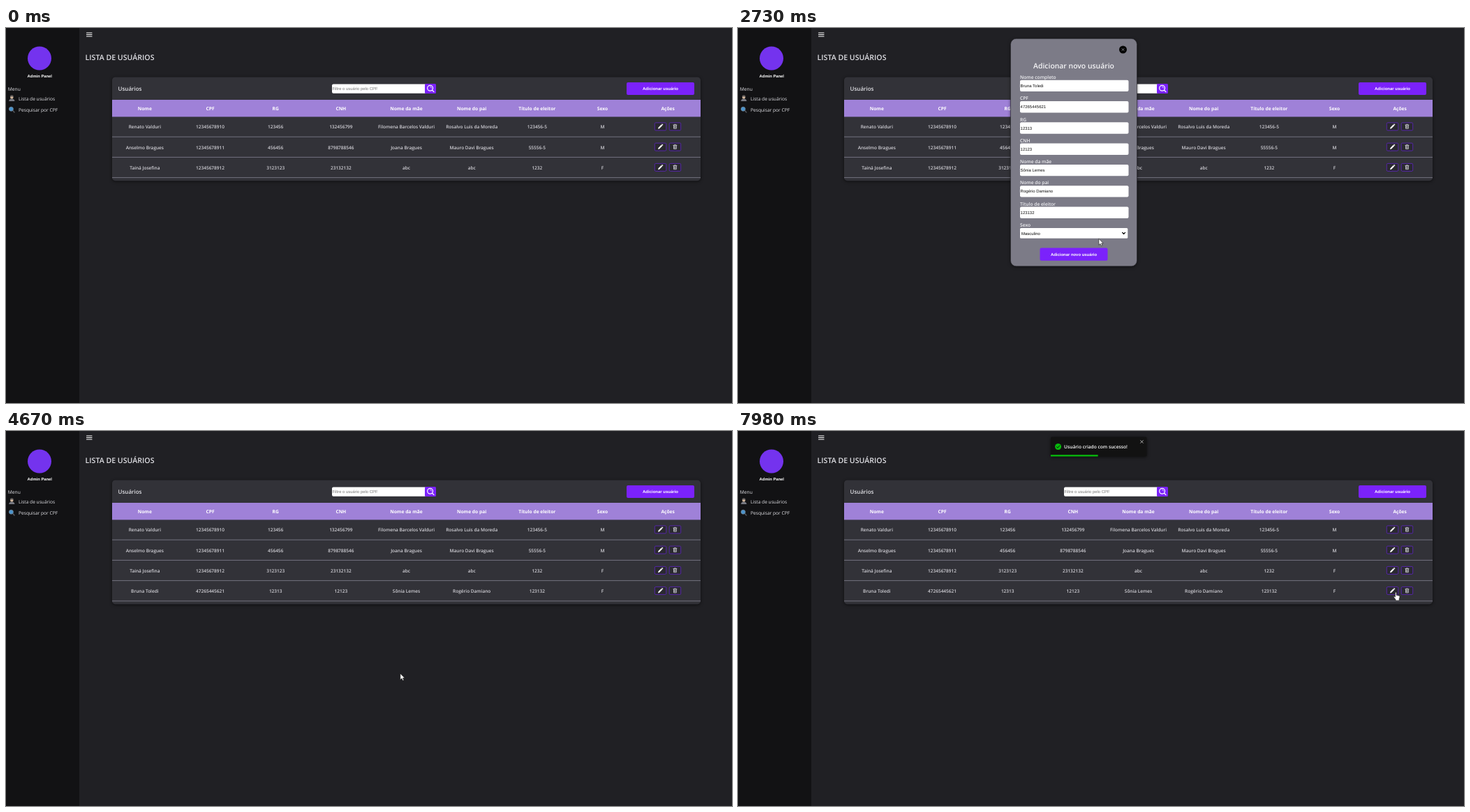
Recreate the animation shown at these times as an HTML page. Size 1040 px wide and 538 px high, loop 8000 ms.

```html
<!DOCTYPE html>
<html lang="pt-BR">
<head>
<meta charset="utf-8">
<title>Lista de usuários</title>
<style>
  html, body { margin: 0; width: 100%; height: 100%; overflow: hidden; background: #202024; }
  svg { display: block; width: 100vw; height: 100vh; }
  text { font-family: "Open Sans", "Noto Sans", sans-serif; text-rendering: geometricPrecision; white-space: pre; }
  .ui { font-family: "Liberation Sans", Arial, sans-serif; }
  .shade { filter: drop-shadow(0 1px 2px rgba(0, 0, 0, .6)); }
</style>
</head>
<body>
<svg id="stage" viewBox="0 0 1040 538" xmlns="http://www.w3.org/2000/svg"></svg>
<script>
const LOOP = 8000;
const PURPLE = '#7b22fb';
const PITCH = 29.25;
const COL = 843 / 9;

const heads = ['Nome', 'CPF', 'RG', 'CNH', 'Nome da mãe', 'Nome do pai', 'Título de eleitor', 'Sexo', 'Ações'];
const users = [
  ['Renato Valduri', '12345678910', '123456', '132456799', 'Filomena Barcelos Valduri', 'Rosalvo Luis da Moreda', '123456-5', 'M'],
  ['Anselmo Bragues', '12345678911', '456456', '8798788546', 'Joana Bragues', 'Mauro Davi Bragues', '55556-5', 'M'],
  ['Tainá Josefina', '12345678912', '3123123', '23132132', 'abc', 'abc', '1232', 'F'],
  ['Bruna Toledi', '47265445621', '12313', '12123', 'Sônia Lemes', 'Rogério Damiano', '123132', 'F']
];
const labels = ['Nome completo', ...heads.slice(1, 8)];

const rect = (x, y, w, h, fill, r = 0, extra = '') =>
  `<rect x="${x}" y="${y}" width="${w}" height="${h}" rx="${r}" fill="${fill}" ${extra}/>`;
const label = (x, y, size, str, { weight = 400, fill = '#e1e1e6', mid = false, ui = false, id = '' } = {}) =>
  `<text x="${x}" y="${y}" font-size="${size}" font-weight="${weight}" fill="${fill}"` +
  `${mid ? ' text-anchor="middle"' : ''}${ui ? ' class="ui"' : ''}${id && ` id="${id}"`}>${str}</text>`;
const line = (d, color, width) =>
  `<path d="${d}" fill="none" stroke="${color}" stroke-width="${width}" stroke-linecap="round" stroke-linejoin="round"/>`;
const button = (id, x, y, w, h, size, str) =>
  `<g id="${id}">${rect(x, y, w, h, PURPLE, 2)}` +
  label(x + w / 2, y + h / 2 + 2.1, size, str, { weight: 700, fill: '#fff', mid: true, ui: true }) + '</g>';

function sidebar() {
  return rect(0, 0, 105, 538, '#121214') +
    `<circle cx="48" cy="43.5" r="17" fill="#7433ee"/>` +
    label(48.3, 71.3, 5.85, 'Admin Panel', { weight: 700, fill: '#fff', mid: true, ui: true }) +
    label(2.8, 89.7, 6.7, 'Menu') +
    label(18, 104, 6.65, 'Lista de usuários') +
    label(18, 120.4, 6.65, 'Pesquisar por CPF') +
    // person
    `<path d="M4.2 105Q4.4 101.6 8.3 101.4Q12.2 101.6 12.4 105Z" fill="#777982"/>` +
    `<circle cx="8.3" cy="99.4" r="2.2" fill="#d3b79d"/>` +
    `<path d="M5.6 98.6Q6 96.3 8.3 96.3Q10.6 96.3 11 98.6Z" fill="#66615f"/>` +
    // magnifier
    line('M9.8 118.6L12 121', '#54565c', 1.5) +
    `<circle cx="7.4" cy="116.2" r="3" fill="#4b93cc" stroke="#6f8799" stroke-width=".8"/>`;
}

function row(cells, i) {
  const y = 127.2 + PITCH * i;
  const b = 135.9 + PITCH * i;
  const box = x => rect(x, b, 16.5, 11, '#2a2930', 1.5, 'stroke="#6025c4" stroke-width=".8"');
  return `<g id="row${i}">` +
    cells.map((c, k) => label(152 + COL * (k + .5), y + 17.2, 6.5, c, { weight: 600, fill: '#d3d2d8', mid: true })).join('') +
    `<path d="M152 ${y + PITCH - .3}H995" stroke="#7b7a88" stroke-width=".9"/>` +
    box(929.3) + box(950.2) +
    `<path transform="translate(937.5 ${b + 5.4})" fill="#fff" d="M-3.4 3.4L-3 1.5 1.2-2.7 2.7-1.2-1.5 3ZM1.6-3.1L2.3-3.7Q2.8-4 3.3-3.4L3.7-3Q4-2.6 3.6-2.2L3.1-1.6Z"/>` +
    `<g transform="translate(958.4 ${b + 5.4})">` +
    line('M-2.5-2.2H2.5M-.9-2.9H.9M-1.9-2V2.9H1.9V-2M-.7-.9V1.8M.7-.9V1.8', '#dddde2', .75) + '</g></g>';
}

function page() {
  return line('M115.5 7H123M115.5 9.5H123M115.5 12H123', '#fff', 1.2) +
    label(113.6, 45.8, 10.6, 'LISTA DE USUÁRIOS', { weight: 600 }) +
    `<rect id="card" class="shade" x="152" y="70.5" width="843" height="148.5" rx="4.5" fill="#323238"/>` +
    label(160.5, 90.2, 8, 'Usuários', { weight: 600 }) +
    rect(467, 80.5, 135, 13.3, '#fff', 2) +
    label(467.4, 89.1, 5.9, 'Filtre o usuário pelo CPF', { fill: '#757575', ui: true }) +
    rect(600, 80, 16, 14, PURPLE, 1.5) +
    `<circle cx="607.6" cy="86.2" r="3.9" fill="none" stroke="#fff" stroke-width="1.2"/>` +
    line('M610.5 89.2L613 91.6', '#fff', 1.3) + line('M607.6 84.2Q609.6 84.3 609.6 86.2', '#fff', .7) +
    button('add', 889, 78, 97, 18, 6, 'Adicionar usuário') +
    rect(152, 103, 843, 24.4, '#9f81d8') +
    heads.map((h, k) => label(152 + COL * (k + .5), 117.6, 6.7, h, { weight: 700, fill: '#fff', mid: true })).join('') +
    users.map(row).join('');
}

function modal() {
  const field = (name, i) => {
    const y = 74.7 + 30.3 * i;
    const isSelect = i === 7;
    const box = isSelect ? rect(404, 287, 154.3, 14.8, '#fff', 1.5) : rect(404, y, 155.5, 16.4, '#fff', 2);
    const value = isSelect
      ? label(406, 296.6, 5.95, '', { fill: '#000', ui: true, id: 'sex' })
      : label(404.6, y + 10.2, 5.97, users[3][i], { fill: '#111', ui: true });
    return label(404, y - 1.8, 6.7, name, { weight: 600, fill: '#efeff2' }) + box + value;
  };
  return '<g id="modal">' +
    rect(390.5, 15.3, 181, 326.5, '#7c7b87', 8, 'class="shade"') +
    rect(390.5, 15.3, 181, 326.5, 'none', 8, 'stroke="#25252a" stroke-width=".6"') +
    '<circle cx="551.5" cy="31" r="5.5" fill="#050505"/>' +
    line('M550.1 29.6L552.9 32.4M552.9 29.6L550.1 32.4', '#a9a9b3', .7) +
    label(481, 57.8, 10.4, 'Adicionar novo usuário', { weight: 600, fill: '#f4f4f6', mid: true }) +
    labels.map(field).join('') +
    line('M550.6 293.4L552.6 295.5 554.6 293.4', '#000', 1.2) +
    button('save', 432.5, 315.6, 97, 18.2, 5.93, 'Adicionar novo usuário') +
    '<g id="list">' + rect(404, 302, 154.2, 17, '#fff', 0, 'stroke="#55555c" stroke-width=".5"') +
    '<rect id="pick" x="404.2" y="302.3" width="153.8" height="8" fill="#1e90ff"/>' +
    label(406, 308.4, 5.95, 'Feminino', { ui: true, id: 'fem' }) +
    label(406, 316.4, 5.95, 'Masculino', { ui: true, id: 'masc' }) + '</g></g>';
}

function toast() {
  return '<g id="toast">' + rect(448, 8.5, 137.5, 28, '#121212', 2, 'class="shade"') +
    '<circle cx="458.6" cy="22.5" r="4.5" fill="#07bc0c"/>' +
    line('M456.5 22.7L458 24.2 460.8 20.9', '#121212', 1) +
    label(467, 24.6, 6.65, 'Usuário criado com sucesso!', { weight: 600, fill: '#fff' }) +
    line('M576.7 13.6L580.3 17.2M580.3 13.6L576.7 17.2', '#dedede', .8) +
    '<rect id="bar" x="448" y="34.2" width="137.5" height="2.3" fill="#07bc0c"/></g>';
}

const pointer = '<circle id="click" r="7" fill="#f2de3a" fill-opacity=".68"/>' +
  '<g id="cursor" fill="#fff" stroke="#111" stroke-width=".6" stroke-linejoin="round">' +
  '<path id="arrow" d="M0 0V9L2.1 7.2 3.6 10.3 5.1 9.6 3.7 6.6H6.4Z"/>' +
  '<path id="hand" d="M-.9.9A.9.9 0 0 1 .9.9V4.2L4.8 5.1Q5.9 5.5 5.7 7.4L4.9 9.6V12H-.3V10.6L-2.8 7.2Q-2.8 5.8-1.6 6.3L-.9 7Z"/></g>';

document.getElementById('stage').innerHTML =
  rect(0, 0, 1040, 538, '#202024') + sidebar() + page() + modal() + toast() + pointer;
const el = {};
document.querySelectorAll('[id]').forEach(e => el[e.id] = e);

// Pointer path: time, x, y
const path = [
  [530, 998, 484], [910, 958, 290], [1290, 912, 92], [1430, 911.7, 91], [1770, 911.7, 91],
  [2050, 705, 340], [2320, 540, 312], [2530, 522, 296], [3010, 515, 312.5], [3130, 515, 312.5],
  [3300, 515, 303.7], [3600, 515, 303.7], [4190, 512.5, 325.8], [4460, 512.5, 325.8],
  [5040, 686.5, 399.3], [6000, 686.5, 399.3], [6390, 834.3, 361], [6810, 880, 311],
  [7560, 942, 232.5], [7700, 942.3, 231.2], [8000, 942.3, 231.2]
];

function slope(i, k) {
  const a = path[i - 1], p = path[i], b = path[i + 1];
  if (!a || !b || (p[1] === a[1] && p[2] === a[2]) || (p[1] === b[1] && p[2] === b[2])) return 0;
  return (b[k] - a[k]) / (b[0] - a[0]);
}

function along(t, k) {
  let i = 0;
  while (i < path.length - 2 && t >= path[i + 1][0]) i++;
  const a = path[i], b = path[i + 1], d = b[0] - a[0];
  const u = Math.max(0, (t - a[0]) / d), v = 1 - u;
  return a[k] * (1 + 2 * u) * v * v + b[k] * u * u * (3 - 2 * u) +
    d * u * v * (slope(i, k) * v - slope(i + 1, k) * u);
}

// Bounce-in offset: share of the run, offset
const bounce = [[0, -1625], [.6, 13.5], [.75, -5.4], [.9, 2.7], [1, 0]];
function drop(u) {
  if (u >= 1) return 0;
  let i = 0;
  while (u >= bounce[i + 1][0]) i++;
  const [a, y0] = bounce[i], [b, y1] = bounce[i + 1];
  return y0 + (y1 - y0) * (1 - Math.pow(1 - (u - a) / (b - a), 3));
}

const show = (e, on) => e.setAttribute('display', on ? 'inline' : 'none');
const inside = (x, y, l, t, w, h) => x >= l && x <= l + w && y >= t && y <= t + h;
const grow = (e, on, cx, cy) =>
  e.setAttribute('transform', on ? `translate(${cx} ${cy}) scale(1.015) translate(${-cx} ${-cy})` : '');

function draw(t) {
  const x = along(t, 1), y = along(t, 2);
  const open = t >= 1570 && t < 4600;
  const listOpen = t >= 2740 && t < 3640;
  const saved = t >= 4600;
  const count = saved ? 4 : 3;

  show(el.modal, open);
  show(el.row3, saved);
  el.card.setAttribute('height', 60.9 + PITCH * count);

  show(el.list, listOpen);
  const fem = y >= 302 && y < 310.3;
  el.pick.setAttribute('y', fem ? 302.3 : 310.5);
  el.fem.setAttribute('fill', fem ? '#fff' : '#000');
  el.masc.setAttribute('fill', fem ? '#000' : '#fff');
  el.sex.textContent = t >= 3640 ? 'Feminino' : 'Masculino';

  const onAdd = t >= 530 && inside(x, y, 889, 78, 97, 18);
  const onSave = open && !listOpen && inside(x, y, 432.5, 315.6, 97, 18.2);
  let onIcon = false;
  for (let i = 0; i < count; i++) {
    const b = 135.9 + PITCH * i;
    onIcon = onIcon || inside(x, y, 929.3, b, 16.5, 11) || inside(x, y, 950.2, b, 16.5, 11);
  }
  grow(el.add, onAdd, 937.5, 87);
  grow(el.save, onSave, 481, 324.7);

  const hand = onAdd || onSave || onIcon;
  show(el.cursor, t >= 530);
  show(el.hand, hand);
  show(el.arrow, !hand);
  el.cursor.setAttribute('transform', `translate(${x} ${y})`);
  show(el.click, (t >= 3500 && t < 3640) || (t >= 4390 && t < 4460));
  el.click.setAttribute('transform', `translate(${x} ${y})`);

  const u = (t - 4645) / 800;
  show(el.toast, u > 0);
  if (u > 0) {
    el.toast.setAttribute('transform', `translate(0 ${drop(u)})`);
    el.toast.setAttribute('opacity', Math.min(1, u / .5));
    el.bar.setAttribute('width', 137.5 * (1 - Math.max(0, t - 5441) / 5000));
  }
}

const start = performance.now();
function tick() {
  draw((performance.now() - start) % LOOP);
  requestAnimationFrame(tick);
}
tick();
</script>
</body>
</html>
```
